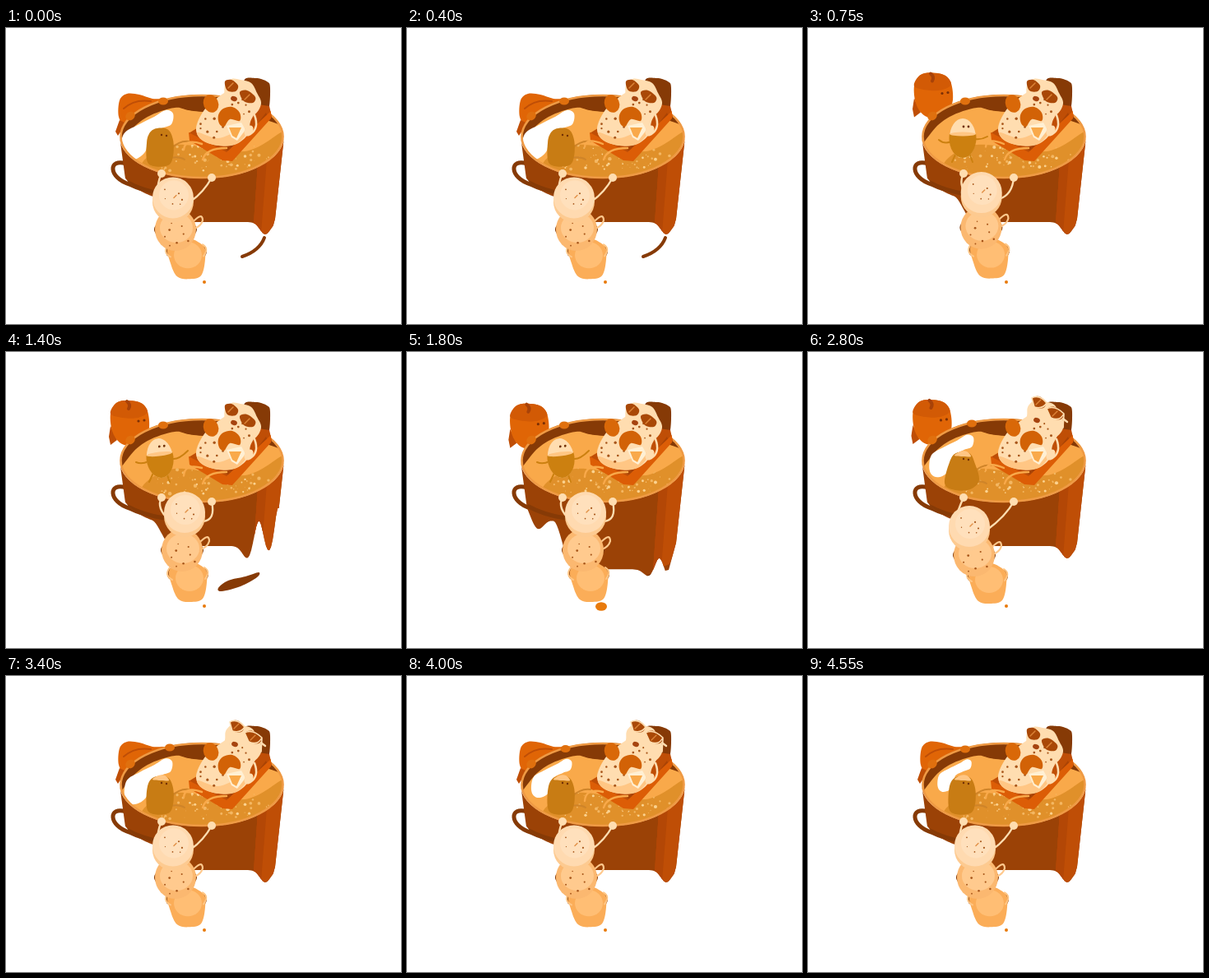
These frames come from a looping animation (480 px wide and 360 px high, 4.6 s). An HTML page with a canvas:

```html
<!DOCTYPE html>
<html lang="en">
<head>
<meta charset="utf-8">
<title>Hot pot</title>
<style>
html, body { margin: 0; width: 100%; height: 100%; overflow: hidden; background: #fff; }
canvas { display: block; width: 480px; height: 360px; }
</style>
</head>
<body>
<canvas id="stage" width="480" height="360"></canvas>
<script>
const c = document.getElementById('stage').getContext('2d');
const LOOP = 4600, STEP = 50, TAU = Math.PI * 2;

const CREAM = '#ffddb0', PEACH = '#ffc684', GOLD = '#cc8010', ORANGE = '#e06506',
  RUST = '#bf4e06', BROWN = '#9b4206', DARK = '#863a06', SOUP = '#e0902a', LIGHT = '#f9a94a';

const clamp = v => Math.max(0, Math.min(1, v));
const ease = v => (v = clamp(v)) * v * (3 - 2 * v);
const mix = (a, b, k) => a + (b - a) * k;
const bump = (x, at, width) => Math.exp(-(((x - at) / width) ** 2));
const rand = n => { const v = Math.sin(n * 127.1) * 43758.5453; return v - Math.floor(v); };

// Eased value through [time, value] pairs
function track(t, ...keys) {
  let v = keys[0][1];
  for (let i = 1; i < keys.length; i++) {
    const [t0, v0] = keys[i - 1], [t1, v1] = keys[i];
    if (t >= t0) v = mix(v0, v1, ease((t - t0) / (t1 - t0)));
  }
  return v;
}

function oval(color, x, y, rx, ry = rx, turn = 0) {
  c.fillStyle = color;
  c.beginPath();
  c.ellipse(x, y, rx, ry, turn, 0, TAU);
  c.fill();
}

function poly(color, ...p) {
  c.fillStyle = color;
  c.beginPath();
  for (let i = 0; i < p.length; i += 2) c.lineTo(p[i], p[i + 1]);
  c.fill();
}

// Smooth closed shape through the points
function blob(color, ...p) {
  const n = p.length / 2, pt = i => [p[(i + n) % n * 2], p[(i + n) % n * 2 + 1]];
  c.fillStyle = color;
  c.beginPath();
  c.moveTo(p[0], p[1]);
  for (let i = 0; i < n; i++) {
    const [a, b, d, e] = [pt(i - 1), pt(i), pt(i + 1), pt(i + 2)];
    c.bezierCurveTo(b[0] + (d[0] - a[0]) / 6, b[1] + (d[1] - a[1]) / 6,
      d[0] - (e[0] - b[0]) / 6, d[1] - (e[1] - b[1]) / 6, d[0], d[1]);
  }
  c.fill();
}

function line(color, width, path) {
  c.lineWidth = width;
  c.lineCap = c.lineJoin = 'round';
  c.strokeStyle = color;
  c.stroke(new Path2D(path));
}

function group(x, y, draw) {
  c.save();
  c.translate(x, y);
  draw();
  c.restore();
}

// Seeded freckles inside an oval
function freckles(x, y, rx, ry, count, size, seed) {
  for (let i = 0; i < count; i++) {
    const a = i * 2.4 + seed, r = .35 + .6 * rand(seed + i);
    oval('#a8561a', x + Math.cos(a) * rx * r, y + Math.sin(a) * ry * r, size * (.6 + .5 * rand(i + 9)));
  }
}

function apple(t) {
  if (t < 600 || t >= 3350) {
    blob(ORANGE, 137, 108, 138, 88, 147, 80, 162, 81, 178, 86, 196, 88, 165, 108, 145, 116);
    poly(RUST, 138, 112, 146, 116, 136, 131, 133, 126);
    line(RUST, 2, 'M143 98Q156 86 176 89');
    return;
  }
  const hop = Math.cos((t - 750) / 2600 * TAU);
  group(150 + 2 * hop, 82 - 4.5 * hop, () => {
    poly(RUST, -23, 8, -25, 21, -23, 31, -15, 25);
    blob(ORANGE, -23, -7, -16, -20, -3, -23, 14, -20, 22, -10, 24, 10, 18, 24, 2, 32, -12, 28, -21, 14);
    blob('#d25a05', -23, -7, -16, -20, -3, -23, 14, -20, 22, -9, 10, -2, -8, -2);
    line('#a84208', 4, 'M-1 -13Q2 -18 -3 -22');
    oval('#7c3006', 11, 2, 1.6);
    oval('#7c3006', 18, 1, 1.6);
  });
}

function broth(t) {
  oval(DARK, 238, 132, 99, 51);
  c.save();
  c.beginPath();
  c.ellipse(238, 132, 98, 50, 0, 0, TAU);
  c.clip();
  blob(LIGHT, 136, 155, 150, 127, 172, 108, 205, 97, 228, 101, 300, 108, 345, 128, 330, 170, 240, 192, 160, 180);
  blob(SOUP, 165, 165, 205, 142, 290, 150, 342, 124, 335, 160, 285, 182, 225, 188, 185, 182);
  for (let i = 0; i < 80; i++) {
    const life = (t / LOOP * 4 + rand(i)) % 1;
    const x = 178 + rand(i + 100) * 142, y = 146 + rand(i + 200) * 30 - life * 5;
    oval(i % 3 ? '#f4b762' : '#fbd28f', x, y, (.6 + rand(i + 300) * 1.7) * Math.sin(life * Math.PI));
  }
  c.restore();
}

function egg(t) {
  if (t >= 575 && t < 2575) {
    const lean = track(t, [750, 0], [1400, 1]);
    group(mix(188, 187, lean), mix(134, 129, lean), () => {
      line(GOLD, 2, `M-14 4Q-22 8 -29 ${2 + lean * 3}M15 1Q23 2 ${30 + lean * 4} ${-2 - lean * 7}M-8 18L-13 29M8 18L12 29`);
      c.rotate(-.12 * lean);
      oval(CREAM, 0, 0, 16, 24);
      c.fillStyle = GOLD;
      c.beginPath();
      c.ellipse(0, 0, 16.5, 24, 0, -.2, Math.PI + .2);
      c.fill();
      oval(PEACH, 0, -5, 15.5, 2.5);
      oval('#713006', 1, -14, 1.4);
      oval('#713006', 7, -14, 1.4);
    });
    return;
  }

  const open = t < 575 ? 1 : track(t, [2800, .85], [3400, .92], [4550, .65]);
  group(190, 104, () => {
    c.scale(open, open);
    blob('#fff', -50, 46, -47, 25, -30, 14, -10, 4, 4, -4, 13, 0, 11, 13, -1, 18, -17, 27, -20, 45, -31, 55, -43, 56);
  });

  const melt = 6 * track(t, [2575, 1], [3400, 0]) * (t >= 2575);
  group(187, 146, () => {
    line('#cf8429', 2, 'M14 0Q25 -10 36 -8M13 12Q24 10 30 14');
    blob('#c87c14', -16 - melt, 14, -15, -12, -7, -23, 9, -23, 16, -10, 16 + melt, 10, 10, 21, -8, 22);
    if (t > 2575) blob(PEACH, -9, -20, -2, -25, 6, -25, 11, -19, 2, -19);
    oval('#713006', 2, -16, 1.2);
    oval('#713006', 8, -15, 1.2);
  });
}

function bather(t) {
  const up = clamp((t - 2550) / 200) * clamp((4450 - t) / 150);
  const sway = Math.sin(t / LOOP * TAU * 2);

  blob(DARK, 289, 66, 303, 61, 317, 65, 321, 73, 318, 102, 302, 108);
  poly(RUST, 222, 128, 245, 114, 300, 92, 320, 95, 323, 108, 274, 158);
  poly('#a94305', 262, 146, 290, 136, 316, 103, 318, 108, 276, 152);
  poly('#dc5d06', 222, 127, 268, 151, 322, 101, 322, 110, 275, 162, 263, 161, 223, 137);
  line(LIGHT, 2.4, `M216 ${148 - sway * 4}Q217 ${134 - sway * 2} 238 141M239 160Q243 146 268 146`);

  blob(CREAM, 240, 101, 258, 84, 275, 76, 298, 86, 304, 98, 297, 114, 294, 129, 280, 141, 258, 143, 238, 136, 231, 122);
  blob(PEACH, 233, 127, 258, 134, 284, 124, 295, 124, 280, 141, 258, 143, 239, 137);
  group(up, -up * 3, () => {
    blob(CREAM, 266, 70, 274, 62, 285, 63, 298, 67, 305, 79, 310, 92, 301, 106, 280, 108, 260, 94, 265, 81);
    oval('#a64410', 277, 86, 4, 3, .4);
  });
  freckles(252, 120, 20, 20, 9, 1.6, 3);
  freckles(284, 96, 17, 14, 7, 1.4, 5);

  group(up * 7, -up * 9, () => {
    line(CREAM, 2.4, 'M272 69L292 82L308 94');
    blob('#a94807', 266, 65, 274, 63, 282, 70, 279, 77, 269, 76);
    blob('#a94807', 284, 78, 293, 76, 303, 84, 300, 91, 289, 89);
    line('#db8337', 1.5, 'M270 73L276 67M290 87L296 81');
    if (up > .5) line(CREAM, 1.6, 'M265 65Q274 60 283 71Q278 79 268 76ZM283 78Q293 73 304 84Q299 94 288 89ZM304 85L303 101');
  });

  oval('#d96808', 249, 92, 9, 11, -.4);
  blob('#d26206', 258, 106, 264, 98, 275, 96, 284, 103, 284, 113, 272, 111, 265, 120, 259, 116);
  poly('#fff0d4', 268, 119, 286, 115, 291, 124, 281, 137, 274, 133);
  poly(LIGHT, 271, 121, 286, 121, 280, 134, 275, 131);
  line(CREAM, 2.5, 'M302 106Q308 122 297 129');
  oval(CREAM, 295, 125, 5, 7, .5);
}

// Lower edge of the visible wall: an arch that drips, then fills to the floor
function hem(x, drip, full) {
  const rim = 132 + 51 * Math.sqrt(Math.max(0, 1 - ((x - 238) / 100) ** 2));
  const left = rim + 32 + full * 44 * bump(x, 158, 11);
  const right = 236 + 15 * bump(x, 315, 9) + full * 62
    + drip * (16 * bump(x, 294, 9) - 40 * bump(x, 308, 8) - 48 * bump(x, 331, 6));
  return mix(left, right, ease((x - 178) / 24));
}

function pot(t) {
  const drip = track(t, [750, 0], [1400, 1], [2250, 0]);
  const full = track(t, [1400, 0], [2250, 1], [2800, 0]);

  line(DARK, 5, 'M146 165C124 158 124 182 150 190Q166 198 184 200');
  if (t < 575) line(DARK, 4, 'M314 255Q308 271 287 278');
  if (t >= 1150 && t < 1800) blob(DARK, 258, 287, 270, 278, 291, 273, 307, 268, 305, 274, 285, 285, 262, 291);

  c.save();
  c.beginPath();
  c.moveTo(138, 100);
  for (let x = 138; x <= 340; x += 2) c.lineTo(x, hem(x, drip, full));
  c.lineTo(340, 100);
  c.clip();
  c.fillStyle = BROWN;
  c.beginPath();
  c.ellipse(238, 132, 100, 51, 0, Math.PI, 0, true);
  for (const p of [[327, 232], [318, 265], [297, 270], [295, 282], [270, 292], [246, 292], [170, 270], [152, 235]]) c.lineTo(...p);
  c.fill();
  c.clip();
  poly(RUST, 306, 165, 340, 130, 328, 235, 319, 258, 299, 266);
  poly('#b34706', 306, 165, 317, 160, 309, 262, 299, 266);
  line(DARK, 5, 'M148 188Q166 198 192 202');
  line(DARK, 3, 'M247 281Q275 280 297 271');
  c.restore();

  c.lineWidth = 2.6;
  c.strokeStyle = '#ef9a44';
  c.beginPath();
  c.ellipse(238, 132, 98.5, 50, 0, 0, TAU);
  c.stroke();
}

function climbers(t) {
  // 0 hangs straight, 1 swings furthest left
  const lean = track(t, [0, .67], [550, .67], [750, .3], [1400, 0], [2300, 0], [2800, 1], [3350, .67]);
  const full = track(t, [1400, 0], [2250, 1], [2800, 0]);
  const hx = 217 - 21 * lean, hy = 196 + 17 * lean;
  const mx = 214 - 12 * lean, my = 241 + 6 * lean;
  const tx = 221 - 3 * lean, ty = 280 + 2 * lean;
  const bow = clamp(1 - lean * 1.5);

  line(CREAM, 2.4, `M189 177Q${183 - bow} 190 ${hx - 18} ${hy - 6 + bow * 15}`);
  line(CREAM, 2.4, `M250 182Q${240 + bow * 15} ${200 + bow * 5} ${hx + 22} ${hy + 3 + bow * 7}`);
  oval('#e87a0c', 241 - 11 * full, 309 + full, 2 + 11 * full, 2 + 7 * full);
  for (const side of [-1, 1]) {
    oval(DARK, tx + side * 20, ty - 10, 5, 7);
    oval(DARK, mx + side * 21, my, 5, 6);
  }

  blob('#fbad58', tx - 22, ty - 16, tx, ty - 26, tx + 21, ty - 16, tx + 23, ty, tx + 18, ty + 20,
    tx + 3, ty + 24, tx - 11, ty + 21, tx - 19, ty + 5);
  oval('#ffbe74', tx + 2, ty - 5, 17, 16);
  line('#ffc98d', 2.2, `M${mx + 20} ${my - 8}q13 -14 13 -3q-2 7 -10 10`);
  line(PEACH, 2, `M${tx - 22} ${ty - 18}q-7 10 3 15M${tx + 20} ${ty - 18}q8 5 1 14`);

  oval('#fbb870', mx, my, 25, 26);
  oval('#ffca8e', mx + 1, my - 2, 20, 18);
  freckles(mx, my + 6, 20, 18, 8, 1.3, 2);

  oval('#fdca90', hx, hy + 4, 25, 25);
  oval('#ffdab0', hx, hy - 1, 25, 25);
  oval('#ffe0bc', hx + 1, hy - 4, 18, 18);
  freckles(hx, hy, 20, 18, 6, 1.1, 7);
  line('#e29148', 1.4, `M${hx + 1} ${hy - 1}l3 -3`);
  oval(CREAM, 189, 177, 5);
  oval(CREAM, 250, 182, 5);
}

function draw(t) {
  c.fillStyle = '#fff';
  c.fillRect(0, 0, 480, 360);
  apple(t);
  broth(t);
  egg(t);
  pot(t);
  bather(t);
  const grip = track(t, [2400, 0], [2700, 1], [3500, 1], [4200, 0]);
  oval('#e0700e', 191 + 8 * grip, 89 - 2 * grip, 6, 4.5);
  oval('#e0700e', 151, 107, 6, 5, -.5);
  climbers(t);
}

const start = performance.now();
function tick() {
  const t = Math.max(0, performance.now() - start) % LOOP;
  draw(Math.floor(t / STEP) * STEP);
  requestAnimationFrame(tick);
}
tick();
</script>
</body>
</html>
```
